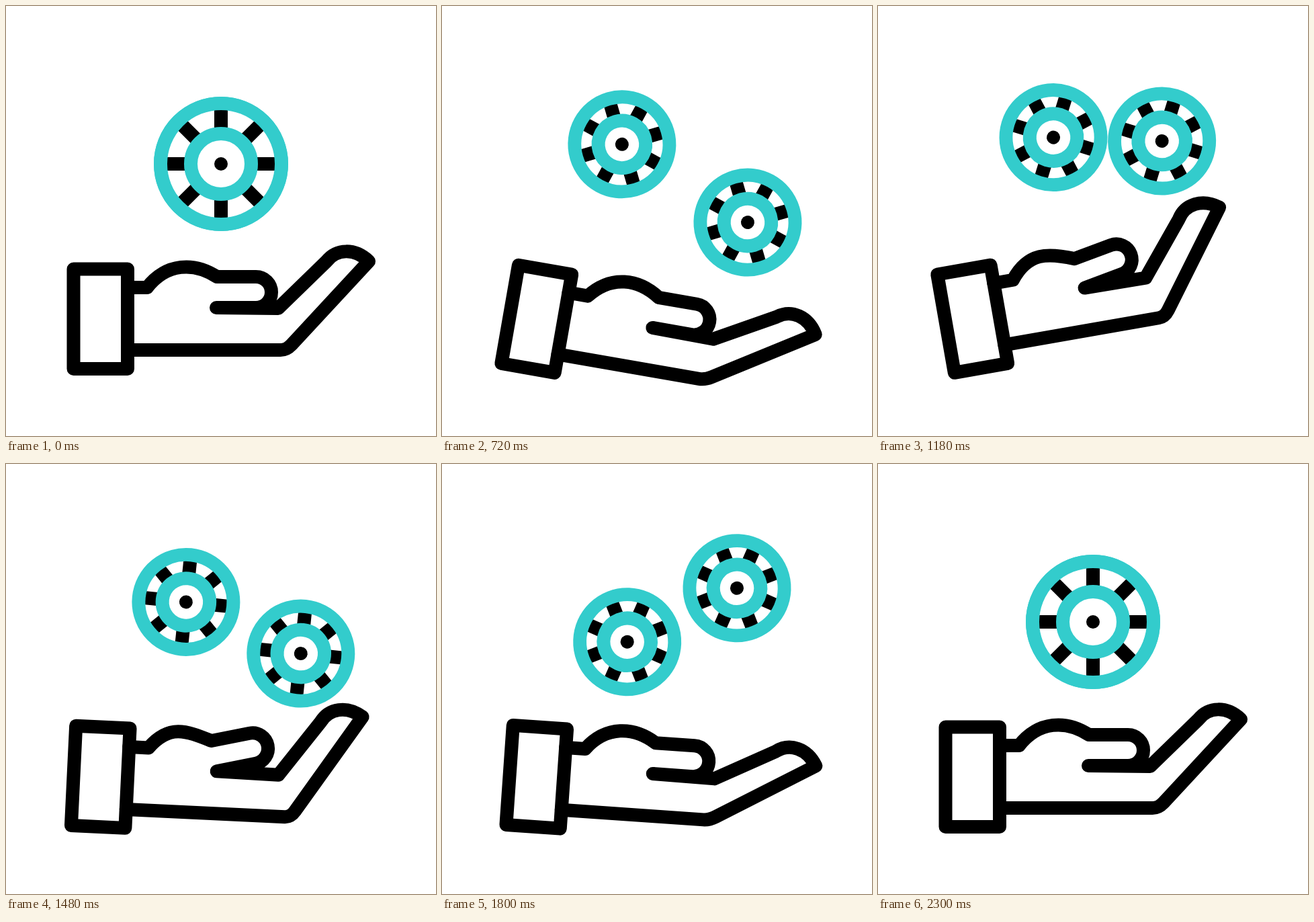
Write an HTML page with a canvas that moves like this. It is 640 px wide and 640 px high and loops after 2.4 s.

```html
<!DOCTYPE html>
<html lang="en">
<head>
<meta charset="utf-8">
<title>Juggling chips</title>
<style>
  html, body { margin: 0; height: 100%; overflow: hidden; background: #fff; }
  canvas { display: block; width: 640px; height: 640px; }
</style>
</head>
<body>
<canvas id="stage" width="640" height="640"></canvas>
<script>
const ctx = document.getElementById('stage').getContext('2d');
const TEAL = '#33cccc', LOOP = 2400, STEP = 20, RAD = Math.PI / 180;
const START = 130, END = 2300;

// All motion is a rest pose plus eased pulses.
function pose(t) {
  const part = (a, b) => Math.min(1, Math.max(0, (t - a) / (b - a)));
  const ease = (a, b) => { const p = part(a, b); return p * p * (3 - 2 * p); };
  const hold = (a, b, c, d) => ease(a, b) - ease(c, d);
  const pulse = (a, b, c) => hold(a, b, b, c);

  const p = part(START, END);
  const push = pulse(START, 680, 1200), pull = pulse(680, 1200, 1500);
  return {
    radius: 90 - 19.5 * hold(START, 520, 1910, END),
    spin: -360 * p * (0.44 + 0.56 * p) - 6 * Math.sin(3 * Math.PI * p),
    left: [
      320 - 52 * hold(START, 670, 1640, END) - 7 * pull,
      235 - 73 * pulse(START, 520, 930) + 18 * pulse(520, 930, 1315)
        - 62 * pulse(930, 1315, 1730) + 31 * pulse(1315, 1730, END)
    ],
    right: [
      320 + 119 * hold(START, 680, 1800, END) + 16.5 * (push - pull),
      235 + 89 * pulse(START, 680, 1220) - 36 * pulse(680, 1220, 1550)
        + 58 * pulse(1220, 1550, 1880) - 69 * pulse(1550, 1880, END)
    ],
    turn: 10 * pulse(195, 700, 1200) - 10 * pulse(700, 1200, 1575) + 5.2 * pulse(1200, 1575, 2290),
    bend: 15 * pulse(275, 700, 1330) - 10 * hold(700, 1330, 1480, 1820) + 16.5 * pulse(1480, 1820, 2290),
    lift: -17.5 * pulse(930, 1370, 1750)
  };
}

// Returns a function that turns points by deg around (cx, cy).
function turner(cx, cy, deg) {
  const c = Math.cos(deg * RAD), s = Math.sin(deg * RAD);
  return (x, y) => [cx + (x - cx) * c - (y - cy) * s, cy + (x - cx) * s + (y - cy) * c];
}

function ring(r) {
  ctx.beginPath();
  ctx.arc(0, 0, r, 0, 2 * Math.PI);
}

function drawChip([x, y], r, spin) {
  ctx.save();
  ctx.translate(x, y);
  ctx.rotate(spin * RAD);
  ctx.fillStyle = '#fff';
  ring(r);
  ctx.fill();
  ctx.strokeStyle = '#000';
  ctx.beginPath();
  for (let i = 0; i < 8; i++) {
    const c = Math.cos(i * Math.PI / 4), s = Math.sin(i * Math.PI / 4);
    ctx.moveTo(c * r / 2, s * r / 2);
    ctx.lineTo(c * r, s * r);
  }
  ctx.stroke();
  ctx.strokeStyle = TEAL;
  ring(r);
  ctx.stroke();
  ring(r / 2);
  ctx.stroke();
  ctx.fillStyle = '#000';
  ring(10);
  ctx.fill();
  ctx.restore();
}

function drawHand({ turn, bend, lift }) {
  const finger = turner(405, 450, bend), thumb = turner(313, 449, lift);
  ctx.save();
  ctx.translate(140.5, 466);
  ctx.rotate(turn * RAD);
  ctx.translate(-140.5, -466);
  ctx.strokeStyle = '#000';
  ctx.lineCap = ctx.lineJoin = 'round';
  ctx.strokeRect(100.5, 391.5, 80.5, 148.5);

  // Thumb
  ctx.beginPath();
  ctx.moveTo(181, 419);
  ctx.lineTo(210, 419);
  ctx.bezierCurveTo(239, 382, ...thumb(280, 381), ...thumb(314, 403));
  ctx.lineTo(...thumb(372, 403));
  ctx.arc(...thumb(372, 426), 23, (lift - 90) * RAD, (lift + 90) * RAD);
  ctx.lineTo(313, 449);

  // Palm and fingers; the knuckle stays on the lower edge of the palm
  const tip = finger(540, 380), low = finger(425, 504);
  const len = Math.hypot(tip[0] - low[0], tip[1] - low[1]);
  const dx = (tip[0] - low[0]) / len, dy = (tip[1] - low[1]) / len;
  const knuckle = low[0] + (512 - low[1]) * dx / dy;
  ctx.lineTo(405, 450);
  ctx.lineTo(...finger(477, 380));
  ctx.bezierCurveTo(...finger(492, 361), ...finger(519, 360), ...tip);
  ctx.lineTo(knuckle + 11 * dx, 512 + 11 * dy);
  ctx.quadraticCurveTo(knuckle, 512, knuckle - 9, 512);
  ctx.lineTo(181, 512);
  ctx.stroke();
  ctx.restore();
}

function draw(now) {
  const now20 = Math.floor(now / STEP) * STEP;
  const state = pose(now20 % LOOP);
  ctx.fillStyle = '#fff';
  ctx.fillRect(0, 0, 640, 640);
  ctx.lineWidth = 20;
  drawHand(state);
  drawChip(state.left, state.radius, state.spin);
  drawChip(state.right, state.radius, state.spin);
}

let start;
function tick(now) {
  start ??= now;
  draw(now - start);
  requestAnimationFrame(tick);
}
requestAnimationFrame(tick);
</script>
</body>
</html>
```
